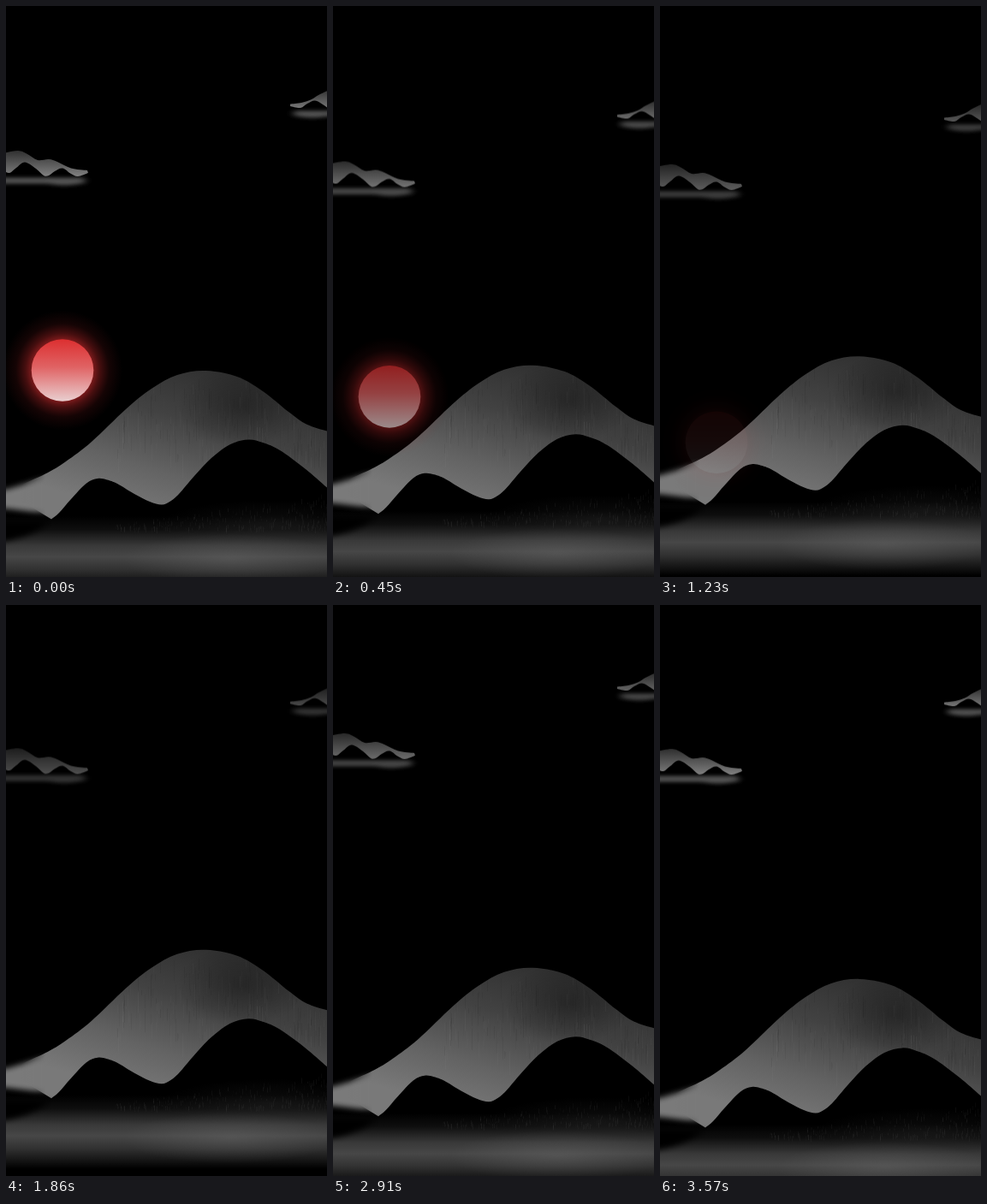
Recreate the animation shown at these times as an HTML page. Size 375x667 px, loop 3600 ms.

```html
<!DOCTYPE html>
<html lang="en">
<head>
<meta charset="utf-8">
<title>Night hills</title>
<style>
html, body { margin: 0; width: 100%; height: 100%; overflow: hidden; background: #000; }
svg { display: block; width: 100vw; height: 100vh; }
</style>
</head>
<body>
<svg viewBox="0 0 375 667" preserveAspectRatio="none">
  <defs>
    <linearGradient id="rock" gradientUnits="userSpaceOnUse" x1="240" y1="424" x2="186" y2="604">
      <stop offset="0" stop-color="#303030"/>
      <stop offset=".35" stop-color="#424242"/>
      <stop offset=".7" stop-color="#636363"/>
      <stop offset="1" stop-color="#797979"/>
    </linearGradient>
    <radialGradient id="shade">
      <stop offset="0" stop-opacity=".32"/>
      <stop offset="1" stop-opacity="0"/>
    </radialGradient>
    <linearGradient id="wisp" x1="0" y1="0" x2="0" y2="1">
      <stop offset="0" stop-color="#303030"/>
      <stop offset="1" stop-color="#808080"/>
    </linearGradient>
    <linearGradient id="disc" x1="0" y1="0" x2="0" y2="1">
      <stop offset="0" stop-color="#dc2f30"/>
      <stop offset=".45" stop-color="#e06364"/>
      <stop offset="1" stop-color="#e9cfd0"/>
    </linearGradient>
    <radialGradient id="halo">
      <stop offset=".5" stop-color="#d22c2e" stop-opacity=".62"/>
      <stop offset=".62" stop-color="#c4282a" stop-opacity=".36"/>
      <stop offset=".78" stop-color="#b02426" stop-opacity=".12"/>
      <stop offset="1" stop-color="#a02022" stop-opacity="0"/>
    </radialGradient>
    <linearGradient id="fog" x1="0" y1="0" x2="0" y2="1">
      <stop offset="0" stop-color="#474747" stop-opacity="0"/>
      <stop offset=".18" stop-color="#474747" stop-opacity=".2"/>
      <stop offset=".4" stop-color="#474747" stop-opacity=".8"/>
      <stop offset=".55" stop-color="#474747"/>
      <stop offset=".72" stop-color="#474747" stop-opacity=".7"/>
      <stop offset="1" stop-color="#474747" stop-opacity="0"/>
    </linearGradient>
    <radialGradient id="glow">
      <stop offset="0" stop-color="#707070" stop-opacity=".34"/>
      <stop offset="1" stop-color="#707070" stop-opacity="0"/>
    </radialGradient>
    <linearGradient id="toRight" gradientUnits="userSpaceOnUse" x1="18" y1="0" x2="46" y2="0">
      <stop offset="0" stop-color="#000"/>
      <stop offset="1" stop-color="#fff"/>
    </linearGradient>
    <mask id="sharpPart" maskUnits="userSpaceOnUse" x="0" y="400" width="375" height="300">
      <rect y="400" width="375" height="300" fill="url(#toRight)"/>
    </mask>
    <filter id="soft" x="-20%" y="-30%" width="140%" height="160%"><feGaussianBlur stdDeviation="5 3"/></filter>
    <filter id="mist" x="-30%" y="-100%" width="160%" height="300%"><feGaussianBlur stdDeviation="4 2.2"/></filter>
    <path id="ridge"/>
    <clipPath id="inRidge"><use href="#ridge"/></clipPath>
  </defs>

  <rect width="375" height="667"/>

  <g id="clouds">
    <g fill="#525252" filter="url(#mist)">
      <rect x="-20" y="200.500" width="112" height="7" rx="3"/>
      <ellipse cx="68" cy="206.500" rx="18" ry="3"/>
    </g>
    <path id="leftCloud" fill="url(#wisp)"/>
    <g fill="#525252" filter="url(#mist)">
      <rect x="336" y="122.500" width="60" height="6" rx="3"/>
      <ellipse cx="358" cy="127.500" rx="18" ry="3"/>
    </g>
    <path id="rightCloud" fill="url(#wisp)"/>
  </g>

  <g id="hills">
    <path d="M-30 569L0 565L40 553L72 546L70 572L52 591L32 591L0 587L-30 585Z" fill="#7a7a7a" filter="url(#soft)"/>
    <g mask="url(#sharpPart)">
      <use href="#ridge" fill="url(#rock)"/>
      <g id="grain" clip-path="url(#inRidge)">
        <ellipse cx="275" cy="468" rx="75" ry="48" fill="url(#shade)"/>
      </g>
    </g>
    <ellipse cx="310" cy="605" rx="130" ry="28" fill="url(#glow)" opacity=".35"/>
    <g id="dust"></g>
    <rect y="596" width="375" height="86" fill="url(#fog)"/>
    <ellipse cx="262" cy="646" rx="125" ry="30" fill="url(#glow)"/>
    <path d="M-25 602 H50 Q35 618 0 625 L-25 628 Z" filter="url(#soft)"/>
  </g>

  <g id="sun">
    <circle cx="66" cy="425.500" r="70" fill="url(#halo)"/>
    <circle cx="66" cy="425.500" r="36.300" fill="url(#disc)"/>
  </g>
</svg>
<script>
const $ = id => document.getElementById(id);
const LOOP = 3600, STEP = 30;

// Smooth curve through points given as "x,y x,y ..."
function curve(text) {
  const p = text.split(' ').map(s => s.split(',').map(Number));
  let d = 'M' + p[0];
  for (let i = 0; i < p.length - 1; i++) {
    const a = p[i - 1] || p[i], b = p[i], c = p[i + 1], e = p[i + 2] || c;
    const at = (q, r, s, k) => [0, 1].map(n => q[n] + k * (s[n] - r[n]) / 6);
    d += 'C' + at(b, a, c, 1) + ' ' + at(c, b, e, -1) + ' ' + c;
  }
  return d;
}
const shape = (top, bottom) => curve(top) + curve(bottom).replace('M', 'L') + 'Z';

$('ridge').setAttribute('d', shape(
  '0,567 45,547 70,532 100,509 140,471 170,447 200,431 233,426 270,433 300,450 330,474 352,489 380,498',
  '380,567 350,541 320,519 300,510 283,506.500 262,512 240,528 220,549 202,570 192,578.500 182,582.500 168,579 150,570 130,558 118,553.500 107,552 94,557.500 76,576 62,592 53,599.500') +
  'L0,590Z');
$('leftCloud').setAttribute('d', shape(
  '-4,172 14,169 25,173 37,180 50,179 60,182 76,189.500 95,192',
  '96,195 84,199 76,196 66,189.500 57,193 50,198 44,198 35,190 22,182.500 12,189 4,195 -4,192'));
$('rightCloud').setAttribute('d', shape(
  '332,114.500 345,113 356,109.500 366,103.500 380,97',
  '380,122 370,115 361,110.500 352,114 344,119 332,117'));

let seed = 7;
const rand = () => (seed = seed * 16807 % 2147483647) / 2147483647;

function streak(parent, x, y, h, fill, alpha) {
  const r = document.createElementNS('http://www.w3.org/2000/svg', 'rect');
  const at = { x, y, width: 1, height: h, fill, 'fill-opacity': alpha };
  for (const k in at) r.setAttribute(k, at[k]);
  $(parent).append(r);
}
for (let i = 0; i < 280; i++) {
  const x = Math.round(130 + 245 * rand()), y = 435 + 90 * rand();
  streak('grain', x, y, 4 + 24 * rand(), rand() < .6 ? '#000' : '#999', .02 + .05 * rand());
}
for (let i = 0; i < 260; i++) {
  const x = Math.round(375 - 250 * rand() ** 1.4), up = rand() ** 1.5;
  streak('dust', x, 610 - up * (x - 90) / 7, 2 + 5 * rand(), '#888', .02 + .07 * rand());
}

const move = (id, y) => $(id).setAttribute('transform', `translate(0 ${y.toFixed(2)})`);

function draw(time) {
  const t = Math.floor(time % LOOP / STEP) * STEP;
  const half = LOOP / 2, quarter = LOOP / 4;

  // Clouds: down 25, up 50, back down, at constant speed
  const q = t / quarter;
  move('clouds', 25 * (q < 1 ? q : q < 3 ? 2 - q : q - 4));
  $('clouds').setAttribute('opacity', 1 - .4 * (1 - Math.abs(t - half) / half));

  // Hills: rise, then sink lower than they began
  move('hills', t < half ? -24.5 * t / half : -24.5 + 36 * (t - half) / half);

  move('sun', .0685 * t);
  $('sun').setAttribute('opacity', Math.max(0, 1 - t / 1350));
}

const start = performance.now();
function tick() {
  draw(performance.now() - start);
  requestAnimationFrame(tick);
}
tick();
</script>
</body>
</html>
```
